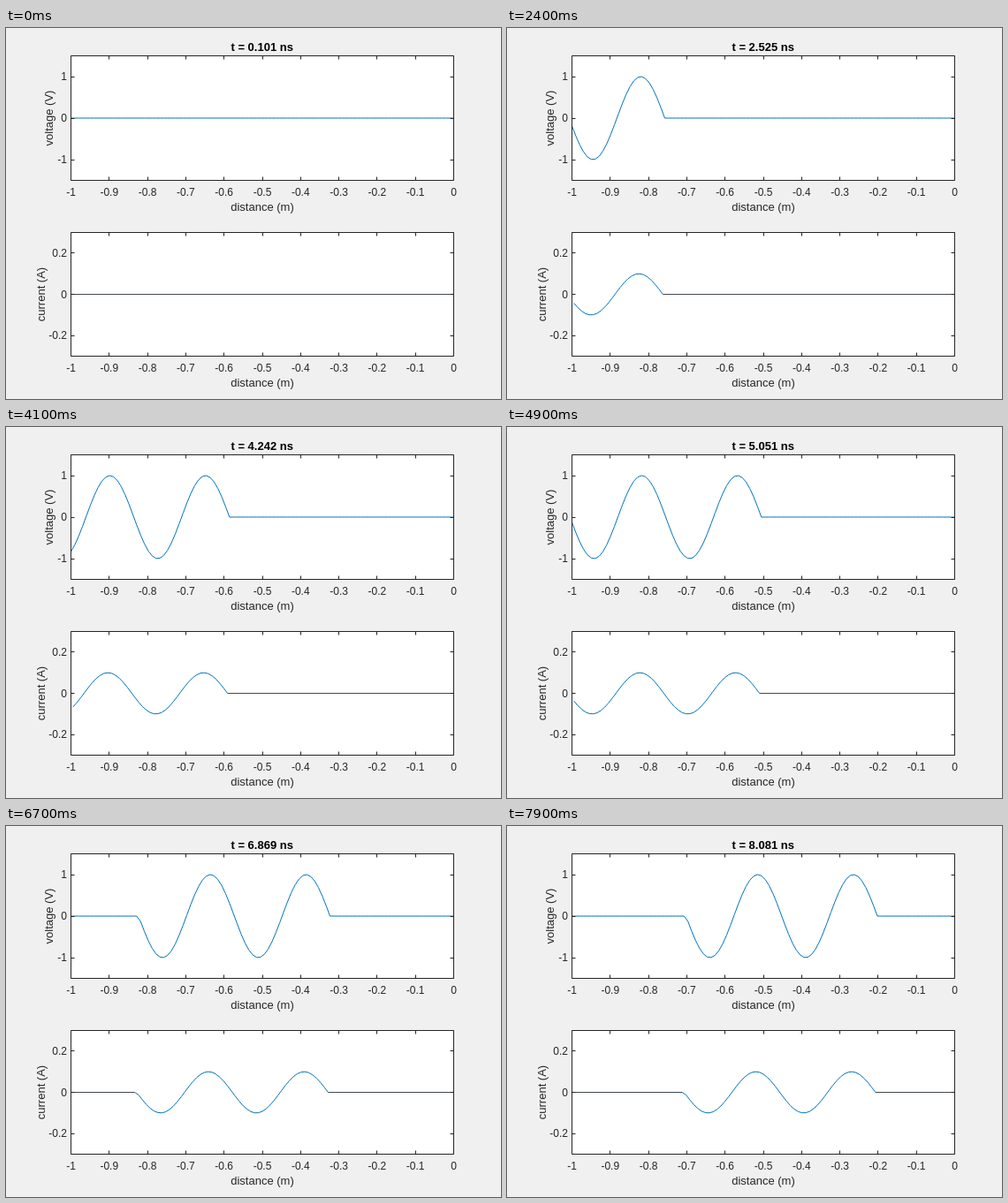
Write an HTML page that moves like this. It is 560 px wide and 420 px high and loops after 8 s.

```html
<!DOCTYPE html>
<html lang="en">
<head>
<meta charset="utf-8">
<title>Pulse on a transmission line</title>
<style>
  html, body { margin: 0; width: 100%; height: 100%; overflow: hidden; background: #f0f0f0; }
  svg { display: block; width: 560px; height: 420px; }
  text { font-family: "Liberation Sans", Arial, Helvetica, sans-serif; font-size: 12px; fill: #262626; text-anchor: middle; }
  .label { font-size: 13px; }
  .title { font-size: 13px; font-weight: bold; fill: #000; }
  .num { text-anchor: end; }
  .axis { fill: none; stroke: #262626; stroke-width: 1; }
  .wave { fill: none; stroke: #0072bd; stroke-width: 1; stroke-linejoin: round; }
  .rest { fill: none; stroke: #444a4e; stroke-width: 1; }
</style>
</head>
<body>
<svg id="stage" viewBox="0 0 560 420"></svg>
<script>
const stage = document.getElementById('stage');
const LEFT = 73.5, RIGHT = 506.5, TICK = 4;
const CELLS = 99;            // grid cells along the line
const STEPS = 80, STEP_MS = 100;
const PERIOD = 24.75;        // cells per wavelength
const PULSE = 2 * PERIOD;

const plots = [
  { top: 31.5, bottom: 172.5, max: 1.5, ticks: [1, 0, -1], name: 'voltage (V)', nameX: 53 },
  { top: 231.5, bottom: 371.5, max: 0.3, ticks: [0.2, 0, -0.2], name: 'current (A)', nameX: 44 }
];

function add(tag, attrs, text) {
  const el = document.createElementNS('http://www.w3.org/2000/svg', tag);
  for (const key in attrs) el.setAttribute(key, attrs[key]);
  if (text !== undefined) el.textContent = text;
  stage.appendChild(el);
  return el;
}

const crisp = v => Math.floor(v) + 0.5;
const cellX = i => LEFT + (RIGHT - LEFT) * i / CELLS;
const valueY = (p, v) => (p.top + p.bottom) / 2 - v * (p.bottom - p.top) / (2 * p.max);
const source = k => k > 0 && k < PULSE ? Math.sin(2 * Math.PI * k / PERIOD) : 0;
const polyline = pts => pts.length > 1 ? 'M' + pts.map(q => q[0].toFixed(2) + ' ' + q[1].toFixed(2)).join('L') : '';

for (const p of plots) {
  const mid = (p.top + p.bottom) / 2;
  add('rect', { x: LEFT, y: p.top, width: RIGHT - LEFT, height: p.bottom - p.top, fill: '#fff' });
  p.rest = add('path', { class: 'rest' });
  p.wave = add('path', { class: 'wave' });

  let d = `M${LEFT} ${p.top}H${RIGHT}V${p.bottom}H${LEFT}Z`;
  for (let i = 0; i <= 10; i++) {
    const x = LEFT + (RIGHT - LEFT) * i / 10;
    d += `M${crisp(x)} ${p.top}v${TICK}M${crisp(x)} ${p.bottom}v${-TICK}`;
    add('text', { x, y: p.bottom + 18 - 0.5 }, String((i - 10) / 10));
  }
  for (const v of p.ticks) {
    const y = valueY(p, v);
    d += `M${LEFT} ${crisp(y)}h${TICK}M${RIGHT} ${crisp(y)}h${-TICK}`;
    add('text', { class: 'num', x: 69, y: Math.round(y + 4.2) }, String(v));
  }
  add('path', { class: 'axis', d });
  add('text', { class: 'label', x: 290, y: p.bottom + 34.5 }, 'distance (m)');
  add('text', { class: 'label', transform: `translate(${p.nameX} ${mid}) rotate(-90)` }, p.name);
}
const title = add('text', { class: 'title', x: 289.7, y: 26 });

function draw(n) {
  const [volt, amp] = plots;
  title.textContent = `t = ${((n + 1) * 10 / CELLS).toFixed(3)} ns`;

  const vPts = [];
  for (let i = 0; i <= CELLS; i++) vPts.push([cellX(i), valueY(volt, source(n - i))]);
  volt.wave.setAttribute('d', polyline(vPts));

  // Current sits half a cell off the voltage grid.
  const head = n - 1, tail = Math.max(0, head - Math.ceil(PULSE));
  const iPts = [];
  for (let j = tail; j <= head; j++) iPts.push([cellX(j + 0.5), valueY(amp, 0.1 * source(head - j))]);
  amp.wave.setAttribute('d', polyline(iPts));

  const zero = valueY(amp, 0);
  let rest = `M${head > 0 ? cellX(head + 0.5) : LEFT} ${zero}H${RIGHT}`;
  if (head >= PULSE) rest += `M${LEFT} ${zero}H${cellX(tail + 0.5)}`;
  amp.rest.setAttribute('d', rest);
}

const start = performance.now();
let shown = -1;
function tick() {
  const n = Math.floor((performance.now() - start) / STEP_MS) % STEPS;
  if (n !== shown) draw(shown = n);
  requestAnimationFrame(tick);
}
tick();
</script>
</body>
</html>
```
